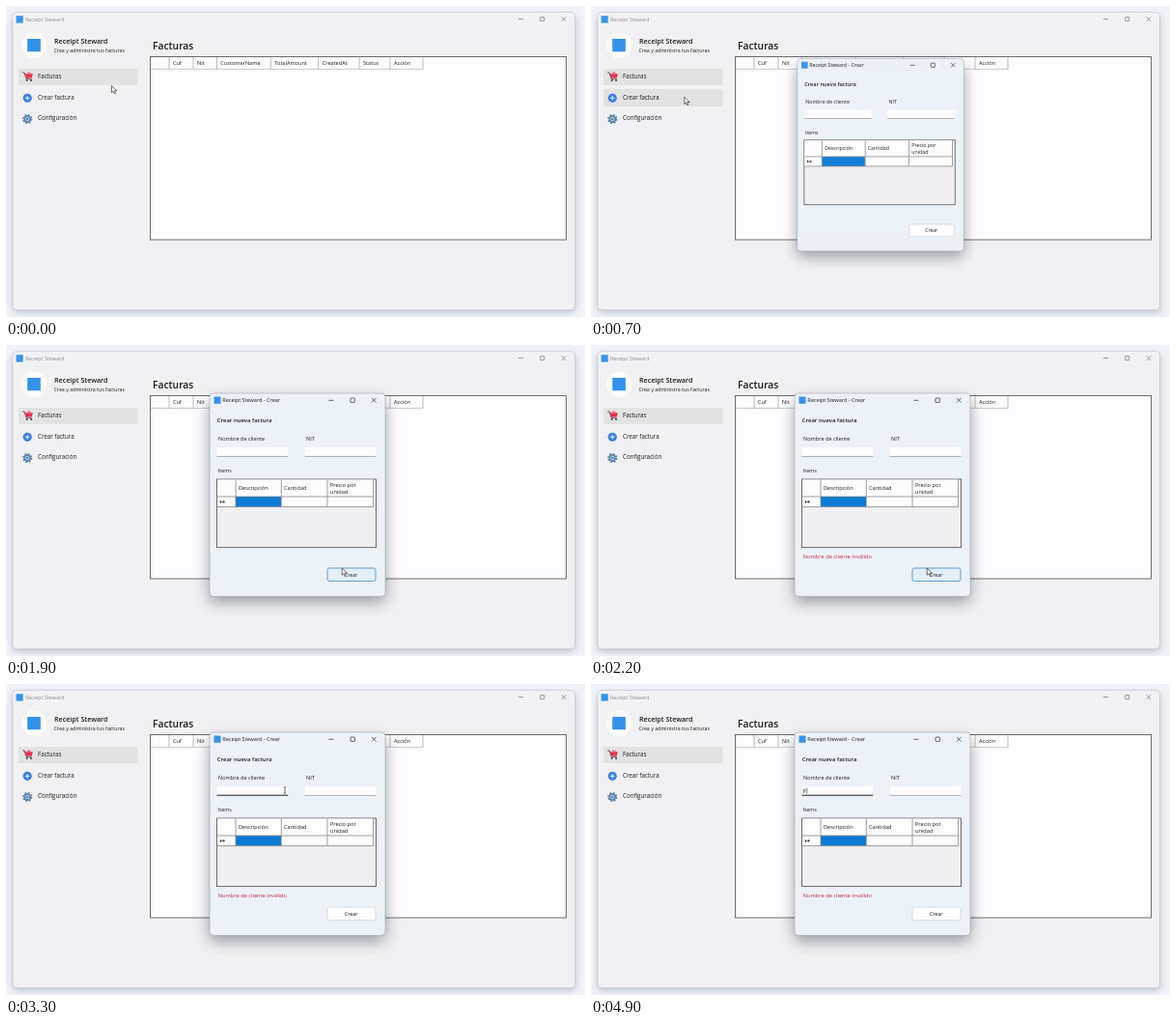
An HTML page that plays this animation: 600 by 322 pixels, repeating every 5000 ms.

```html
<!DOCTYPE html>
<html lang="es">
<head>
<meta charset="utf-8">
<title>Receipt Steward</title>
<style>
html, body { margin: 0; width: 100%; height: 100%; overflow: hidden; background: #eff2f9; }
svg { display: block; width: 100%; height: 100%; }
text { font-family: "Open Sans", "Noto Sans", sans-serif; font-size: 5.6px; fill: #1c1c1e; white-space: pre; }
.bold { font-weight: 600; }
.menu { font-size: 6.2px; }
</style>
</head>
<body>
<svg viewBox="0 0 600 322" xmlns="http://www.w3.org/2000/svg">
  <defs>
    <filter id="soft" x="-20%" y="-20%" width="140%" height="140%"><feGaussianBlur stdDeviation="3.5"/></filter>
    <filter id="deep" x="-30%" y="-30%" width="160%" height="160%"><feGaussianBlur stdDeviation="8"/></filter>
  </defs>
  <rect width="600" height="322" fill="#eff2f9"/>
  <rect x="7" y="10" width="583" height="307" rx="5" fill="#6b7280" opacity=".4" filter="url(#soft)"/>
  <rect x="7" y="6.7" width="582.5" height="308" rx="4" fill="#f1f0f2" stroke="#c3c6cc" stroke-width=".7"/>
  <path d="M7.4 20.5V11q0-4 4-4H585q4 0 4 4v9.5z" fill="#f2f2f5"/>
  <rect x="10.5" y="10.2" width="7.2" height="7.4" fill="#3b93e6"/>
  <text x="20" y="16" style="font-size:5.4px;fill:#8b8b8f">Receipt Steward</text>
  <g fill="none" stroke="#77777b" stroke-width=".7">
    <path d="M531 13.6h5M575.6 11.2l4.6 4.8m0-4.8l-4.6 4.8"/>
    <rect x="553.7" y="11.5" width="4" height="4.2" rx=".5"/>
  </g>

  <circle cx="29" cy="40.5" r="13.3" fill="#fafafb"/>
  <rect x="22.2" y="34" width="13.6" height="13.2" fill="#3491e8"/>
  <text x="50" y="39" class="bold" style="font-size:7.15px">Receipt Steward</text>
  <text x="49.5" y="48.3" style="font-size:5.3px">Crea y administra tus facturas</text>

  <rect x="13" y="65" width="123.5" height="17" rx="1" fill="#e3e2e3"/>
  <rect id="hover" x="13" y="86" width="123.5" height="18" rx="1" fill="#e3e2e3"/>
  <g>
    <path d="M17.2 69h1.9l1.9 6.3h5.6" fill="none" stroke="#5a3a48" stroke-width=".9"/>
    <path d="M19.5 70.2h8.3l-1.1 4.4h-5.9z" fill="#df3550"/>
    <path d="M22 68.5h3.5v1.7H22z" fill="#ef7285"/>
    <circle cx="21.7" cy="77" r="1.1" fill="#40455a"/>
    <circle cx="26" cy="77" r="1.1" fill="#40455a"/>
  </g>
  <circle cx="22.2" cy="95.3" r="4.6" fill="#3b7fe0"/>
  <path d="M19.9 95.3h4.6M22.2 93v4.6" stroke="#fff" stroke-width=".9"/>
  <circle cx="22.2" cy="117" r="4.3" fill="none" stroke="#557a9e" stroke-width="1.6" stroke-dasharray="1.7 1.677"/>
  <circle cx="22.2" cy="117" r="2.9" fill="#d8e8f4" stroke="#5f89b0" stroke-width="2"/>
  <circle cx="22.2" cy="117" r="1.2" fill="#4d7da8"/>
  <text x="33" y="74.8" class="menu">Facturas</text>
  <text x="33" y="96.7" class="menu">Crear factura</text>
  <text x="33" y="118.3" class="menu">Configuración</text>

  <text x="152" y="44.8" class="bold" style="font-size:10.3px">Facturas</text>
  <rect x="149.5" y="52.5" width="431" height="189.5" fill="#fdfcfe" stroke="#5d5d60" stroke-width=".9"/>
  <g id="columns"></g>

  <g id="dialog">
    <rect x="211" y="58" width="182" height="208" rx="5" fill="#1f2937" opacity=".45" filter="url(#deep)"/>
    <rect x="211" y="50" width="182" height="210.3" rx="4" fill="#edf1f8" stroke="#a2a7b0" stroke-width=".6"/>
    <rect x="215.5" y="53.5" width="7" height="7.3" fill="#3b93e6"/>
    <text x="224.3" y="59.4" style="font-size:5.5px">Receipt Steward - Crear</text>
    <g fill="none" stroke="#2b2b2f" stroke-width=".7">
      <path d="M334.5 57.3h5M379 54.9l4.6 4.6m0-4.6l-4.6 4.6"/>
      <rect x="357" y="55" width="4.4" height="4.4" rx=".5"/>
    </g>
    <text x="218.8" y="80.3" class="bold" style="font-size:5.95px">Crear nueva factura</text>
    <text x="220" y="99.2">Nombre de cliente</text>
    <text x="311" y="99.2">NIT</text>
    <path d="M218.5 106h73.7v9.6h-73.7zM309.7 106h73.7v9.6h-73.7z" fill="#fdfdfe"/>
    <path d="M218.5 115.4h73.7M309.7 115.4h73.7" stroke="#8d9097" stroke-width=".7"/>
    <path id="focusLine" d="M218.5 115.2h73.7" stroke="#34383f" stroke-width="1"/>
    <text id="typed" x="219.6" y="112.7"></text>
    <path id="caret" d="M223.8 107.5v6.2" stroke="#222" stroke-width=".6"/>
    <text x="219.8" y="132.4" style="font-size:5.4px">Items</text>

    <rect x="218.5" y="139" width="165" height="70.6" fill="#f0eff1" stroke="#5d5d60" stroke-width=".9"/>
    <path d="M219 139.5h161.5v28H219z" fill="#fdfdfe"/>
    <path d="M238 157h47v10.6h-47z" fill="#0b7ad4"/>
    <path d="M219 157h161.5M219 167.6h161.5M238 139.5v28.1M285.3 139.5v28.1M333 139.5v28.1M380.6 139.5v28.1" fill="none" stroke="#85858a" stroke-width=".8"/>
    <path d="M221.8 160.8v3.2l2-1.6z" fill="#222"/>
    <path d="M224 162.4h3M225.5 161v2.8M224.5 161.3l2 2.2m0-2.2l-2 2.2" stroke="#222" stroke-width=".5"/>
    <g style="font-size:5.5px">
      <text x="241" y="150.2">Descripción</text>
      <text x="288" y="150.2">Cantidad</text>
      <text x="336" y="147">Precio por</text>
      <text x="336" y="154.2">unidad</text>
    </g>
    <text id="error" x="219.8" y="220.5" style="fill:#c32f45;font-size:5.7px">Nombre de cliente inválido</text>
    <rect id="button" x="333" y="231" width="50" height="13.5" rx="2" stroke-width=".8"/>
    <text x="357.6" y="239.9" text-anchor="middle" style="font-size:5.4px">Crear</text>
  </g>

  <path id="arrow" d="M0 0v7.2l1.7-1.5 1.2 2.6 1.2-.5-1.1-2.6h2.3z" fill="#fff" stroke="#222" stroke-width=".65"/>
  <path id="beam" d="M-1.2-3.2h.8l.4.4.4-.4h.8M0-2.8v5.6M-1.2 3.2h.8l.4-.4.4.4h.8" fill="none" stroke="#222" stroke-width=".7"/>
</svg>
<script>
const LOOP = 5000, STEP = 100;
const el = Object.fromEntries([...document.querySelectorAll("[id]")].map(n => [n.id, n]));

// Column headers: label, text x, right edge
const headers = [
  ["", 0, 169], ["Cuf", 173, 194], ["Nit", 198, 218.5], ["CustomerName", 222.3, 274.3],
  ["TotalAmount", 278.3, 323.7], ["CreatedAt", 327.7, 366], ["Status", 370, 398], ["Acción", 402, 432]
];
el.columns.innerHTML = headers.map(([label, x, edge]) =>
  `<text x="${x}" y="61.1">${label}</text><path d="M${edge} 53v12.5" stroke="#a9a9ad" stroke-width=".8"/>`
).join("") + '<path d="M150 65.4h282" stroke="#bdbdc1" stroke-width=".8"/>';

// Pointer route: time, x, y
const route = [
  [0, 109.5, 82.5], [100, 108, 84], [400, 96.8, 94.3], [900, 96.8, 94.3], [1100, 190.5, 94],
  [1500, 300, 170], [1800, 347, 230], [1900, 348.2, 231], [2300, 348.2, 231], [2600, 298.8, 168.3],
  [3000, 276, 112], [3300, 289, 110], [LOOP, 289, 110]
];

function pointer(t) {
  const i = route.findIndex(p => p[0] > t);
  const [t0, x0, y0] = route[i - 1], [t1, x1, y1] = route[i];
  const u = (t - t0) / (t1 - t0), k = u * u * (3 - 2 * u);
  return [x0 + (x1 - x0) * k, y0 + (y1 - y0) * k];
}

function typedText(t) {
  if (t < 3700) return "";
  if (t < 3900) return "1";
  if (t < 4400) return "12";
  if (t < 4500) return "1";
  return t < 4800 ? "" : "P";
}

const show = (node, on) => node.setAttribute("display", on ? "inline" : "none");

function draw(t) {
  const [x, y] = pointer(t);
  const inField = t >= 3000, hidden = t >= 4400;
  const focused = t >= 3200;
  show(el.hover, t < 1000 && y >= 86);

  show(el.dialog, t >= 700);
  const opening = t < 800;
  el.dialog.setAttribute("transform", opening ? "translate(300 154) scale(.948) translate(-302 -155)" : "");
  el.dialog.setAttribute("opacity", opening ? .97 : 1);

  const over = t >= 1800 && t < 2400;
  const pressed = t >= 1900 && !focused;
  el.button.setAttribute("fill", over ? "#e2eff9" : "#fdfdfe");
  el.button.setAttribute("stroke", over || pressed ? "#3d8fd1" : "#d3d6dc");
  show(el.error, t >= 2100);

  show(el.focusLine, focused);
  el.typed.textContent = typedText(t);
  show(el.caret, t >= 4800);

  const place = `translate(${x} ${y})`;
  el.arrow.setAttribute("transform", place);
  el.beam.setAttribute("transform", place);
  show(el.arrow, !inField);
  show(el.beam, inField && !hidden);
}

const start = performance.now();
function tick() {
  const t = (performance.now() - start) % LOOP;
  draw(Math.floor(t / STEP) * STEP);
  requestAnimationFrame(tick);
}
tick();
</script>
</body>
</html>
```
